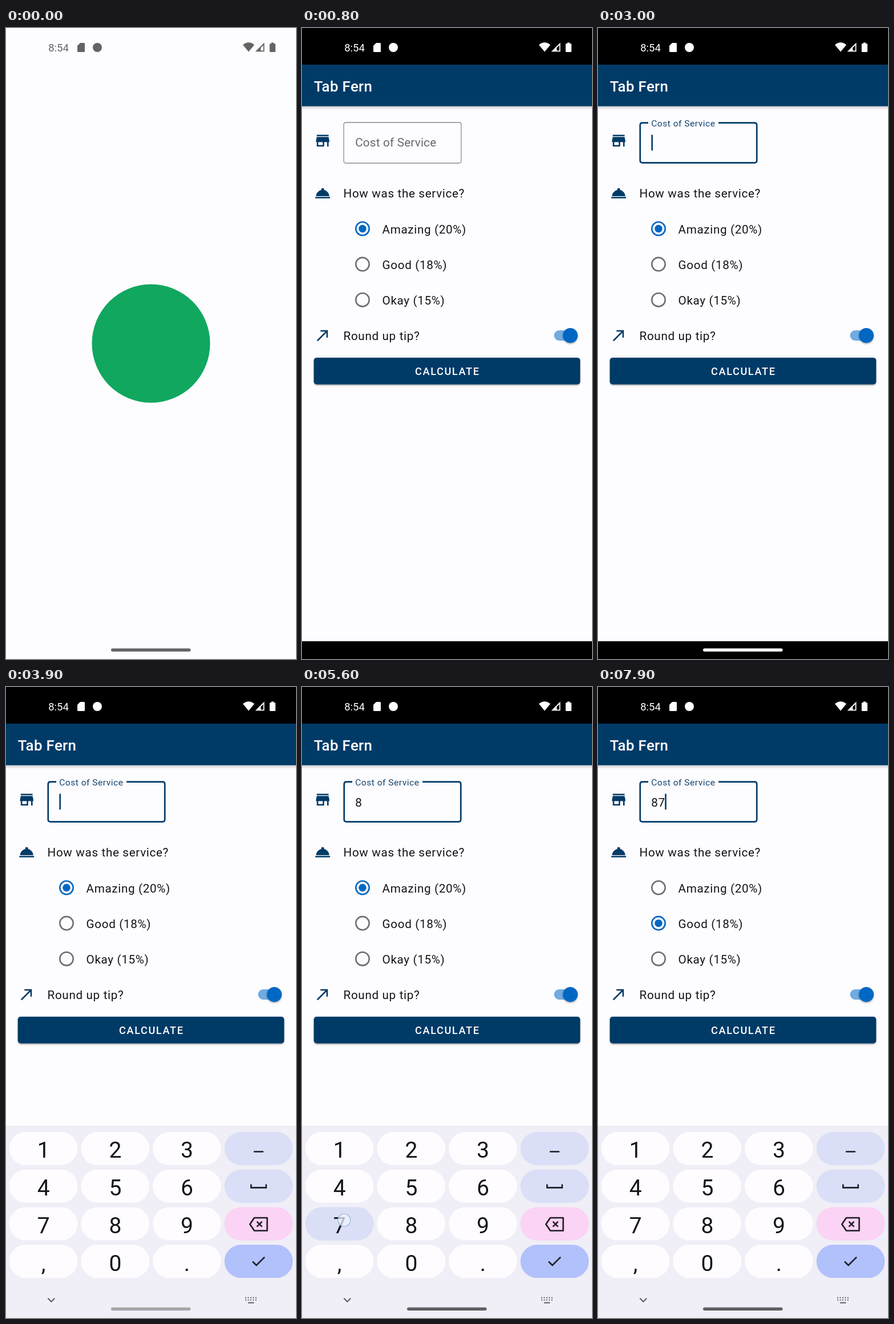
An HTML page that plays this animation: 508x1102 px, repeating every 8000 ms.

```html
<!DOCTYPE html>
<html lang="en">
<head>
<meta charset="utf-8">
<title>Tip calculator</title>
<style>
  html, body { margin: 0; width: 100%; height: 100%; overflow: hidden; background: #fdfcff; }
  svg { display: block; width: 100vw; height: 100vh; }
  text { font-family: Roboto, "Open Sans", sans-serif; white-space: pre; }
  .body { font-size: 20.7px; letter-spacing: .647px; fill: #141417; }
  .title { font-size: 25.9px; font-weight: 500; letter-spacing: .32px; fill: #fff; }
  .button { font-size: 18.1px; font-weight: 500; letter-spacing: 1.62px; fill: #fff; }
  .digit { font-size: 39px; fill: #141418; text-anchor: middle; }
  .line { fill: none; stroke: #1d1d24; stroke-width: 2.6; }
  .navy { fill: #003b68; }
</style>
</head>
<body>
<svg viewBox="0 0 508 1102" preserveAspectRatio="none">
  <defs>
    <linearGradient id="barShade" x2="0" y2="1">
      <stop stop-opacity=".2"/>
      <stop offset="1" stop-opacity="0"/>
    </linearGradient>
    <linearGradient id="sweep" gradientUnits="userSpaceOnUse" x1="0" x2="0">
      <stop stop-color="#fff"/>
      <stop offset="1" stop-color="#000"/>
    </linearGradient>
    <mask id="reveal" maskUnits="userSpaceOnUse" x="0" y="0" width="508" height="1102">
      <rect width="508" height="1102" fill="url(#sweep)"/>
    </mask>
    <filter id="soft" x="-30%" y="-30%" width="160%" height="160%">
      <feGaussianBlur stdDeviation="1.5"/>
    </filter>
  </defs>

  <rect width="508" height="1102" fill="#fdfcff"/>
  <circle id="splash" cx="254" cy="551" r="103.5" fill="#11a75f"/>

  <g id="app">
    <g id="screen">
      <rect width="508" height="1102" fill="#fdfcff"/>
      <rect y="136" width="508" height="7" fill="url(#barShade)"/>
      <rect width="508" height="64.3"/>
      <rect class="navy" y="64" width="508" height="72.6"/>
      <text class="title" x="20.7" y="110.6">Tab Fern</text>

      <g class="navy">
        <path transform="translate(20.7 181.2) scale(1.294)" d="M20 4H4v2h16V4zm1 10v-2l-1-5H4l-1 5v2h1v6h10v-6h4v6h2v-6h1zm-9 4H6v-4h6v4z"/>
        <path transform="translate(20.7 273) scale(1.294)" d="M2 17h20v2H2zm11.84-9.21c.1-.24.16-.51.16-.79 0-1.1-.9-2-2-2s-2 .9-2 2c0 .28.06.55.16.79C6.25 8.6 3.27 11.93 3 16h18c-.27-4.07-3.25-7.4-7.16-8.21z"/>
        <path transform="translate(20.7 521.3) scale(1.294)" d="M9 5v2h6.59L4 18.59 5.41 20 17 8.41V15h2V5z"/>
      </g>

      <path id="outline" fill="none"/>
      <text id="hint" x="93.2">Cost of Service</text>
      <text id="entry" class="body" x="93.2" y="208.8"></text>
      <rect id="cursor" class="navy" y="186.5" width="2.6" height="27.5"/>

      <text class="body" x="72.5" y="296.3">How was the service?</text>
      <g id="radios"></g>
      <text class="body" x="72.5" y="545">Round up tip?</text>

      <rect x="441.5" y="528" width="41" height="18" rx="9" fill="#70abe1"/>
      <circle cx="470" cy="538.6" r="13" opacity=".35" filter="url(#soft)"/>
      <circle cx="470" cy="537" r="13" fill="#0067c3"/>

      <rect x="21" y="578" width="466" height="46" rx="5" opacity=".35" filter="url(#soft)"/>
      <rect class="navy" x="20.7" y="575.7" width="466.6" height="46.8" rx="5"/>
      <text class="button" x="254.8" y="606" text-anchor="middle">CALCULATE</text>
      <rect y="1071" width="508" height="31"/>
    </g>
  </g>

  <g id="pad">
    <rect y="766" width="508" height="340" fill="#f0eef6"/>
    <g id="keys"></g>
    <path class="line" d="M434 811.5H451M429.3 868.5V874.4H455.7V868.5"/>
    <path class="line" stroke-linejoin="round" d="M435 927H457.5V949.5H435L427.3 938.2ZM439.5 933.7L448.5 942.7M448.5 933.7L439.5 942.7"/>
    <path class="line" d="M432 1003.5L438.7 1010L453 995.7"/>
    <path class="line" style="stroke:#5e5d64;stroke-width:2" d="M73.3 1067.5L79.3 1073.5L85.3 1067.5"/>
    <path class="line" style="stroke:#5e5d64;stroke-width:2;stroke-dasharray:2 2.45" d="M419 1066.4H439.5M419 1070.6H439.5"/>
    <path class="line" style="stroke:#5e5d64;stroke-width:2" d="M424 1075.4H434.5"/>
  </g>

  <g id="status">
    <text x="74.2" y="40.6" font-size="18.5">8:54</text>
    <path d="M130 26H136.5Q138 26 138 27.5V40.5Q138 42 136.5 42H126.5Q125 42 125 40.5V31Z"/>
    <circle cx="160" cy="34" r="8"/>
    <path d="M415 29.4Q425 21.2 435 29.4L425 41.5Z"/>
    <path fill-rule="evenodd" d="M436.7 41.3L452.5 25.5V41.3ZM446.3 34.6V39.6H450.7V30.2Z"/>
    <path d="M464.7 25.6H469V27.3H470.8Q472 27.3 472 28.5V40.8Q472 42 470.8 42H463Q461.8 42 461.8 40.8V28.5Q461.8 27.3 463 27.3H464.7Z"/>
  </g>
  <rect id="handle" x="184" y="1083.6" width="139.5" height="5.4" rx="2.7"/>
  <circle id="touch" r="11" fill="#eef5ff" fill-opacity=".72" stroke="#9fb3d6" stroke-width="1.2"/>
</svg>

<script>
const LOOP = 8000, STEP = 100;
const $ = id => document.getElementById(id);
const set = (el, attrs) => { for (const k in attrs) el.setAttribute(k, attrs[k]); };
const add = (parent, tag, attrs, label) => {
  const el = document.createElementNS("http://www.w3.org/2000/svg", tag);
  set(el, attrs);
  if (label) el.textContent = label;
  return parent.appendChild(el);
};
const ramp = (t, from, to) => Math.min(1, Math.max(0, (t - from) / (to - from)));
const mix = (a, b, k) => a + (b - a) * k;
const easeOut = k => 1 - (1 - k) ** 3;
const within = (t, from, to) => t >= from && t < to;

const FOCUS = 2800, TYPE_8 = 4800, TYPE_7 = 5700, PICK = 7100;
const taps = [
  { from: 2700, to: FOCUS, x: 168, y: 203 },
  { from: 4700, to: TYPE_8, x: 199, y: 934, key: "8" },
  { from: 5500, to: TYPE_7, x: 74, y: 931, key: "7" },
  { from: 7000, to: PICK, x: 150, y: 415 }
];

const radios = ["Amazing (20%)", "Good (18%)", "Okay (15%)"].map((label, i) => {
  const cx = 106, cy = 350.5 + i * 62.1, g = $("radios");
  const ripple = add(g, "circle", { cx, cy, r: 26, fill: "#0067c3" });
  const ring = add(g, "circle", { cx, cy, r: 11.7, fill: "none", "stroke-width": 2.6 });
  const dot = add(g, "circle", { cx, cy, fill: "#0067c3" });
  add(g, "text", { class: "body", x: 140.5, y: cy + 8.2 }, label);
  return { ripple, ring, dot };
});

const keyColor = "#fefcff", pressed = "#dadff7";
const sideColors = [pressed, pressed, "#fbd3f4", "#b1c1fb"];
const keys = {};
["123", "456", "789", ",0."].forEach((row, r) => {
  const y = 777 + r * 65.7;
  [...row, ""].forEach((label, c) => {
    const x = 5.7 + c * 125.65;
    const key = add($("keys"), "rect", {
      x, y, width: 119.8, height: 58, rx: 29, fill: label ? keyColor : sideColors[r]
    });
    if (!label) return;
    keys[label] = key;
    add($("keys"), "text", { class: "digit", x: x + 60, y: y + 45.4 }, label);
  });
});

// System bar tint: translucent black (0) to solid white (1).
function tint(el, k) {
  const v = Math.round(255 * k);
  set(el, { fill: `rgb(${v},${v},${v})`, opacity: mix(.6, 1, k) });
}

function drawOpening(t) {
  const k = ramp(t, 400, 800);
  set($("splash"), { opacity: 1 - ramp(t, 100, 400) });
  set($("screen"), { transform: `translate(0 ${14 * (1 - k)})` });
  set($("app"), { opacity: t < 500 ? k * .92 : mix(.23, 1, ramp(t, 500, 800)) });
  if (t < 800) {
    const edge = 510 + (t - 500) * 5;
    set($("sweep"), { y1: edge - 110, y2: edge });
    set($("app"), { mask: "url(#reveal)" });
  } else {
    $("app").removeAttribute("mask");
  }
  tint($("status"), ramp(t, 550, 750));
  tint($("handle"), t < 3000 ? ramp(t, 850, 1050) : 1 - ramp(t, 3820, 4020));
}

function drawField(t) {
  const k = easeOut(ramp(t, FOCUS - 50, FOCUS + 150));
  const focused = t >= FOCUS;
  const inset = focused ? .7 : 0;
  const l = 73.1 + inset, r = 278.9 - inset, top = 165 + inset, b = 236 - inset;
  const mid = 149.5, gap = 61.5 * k;
  set($("outline"), {
    d: `M${mid + gap} ${top}H${r - 4}Q${r} ${top} ${r} ${top + 4}V${b - 4}Q${r} ${b} ${r - 4} ${b}` +
       `H${l + 4}Q${l} ${b} ${l} ${b - 4}V${top + 4}Q${l} ${top} ${l + 4} ${top}H${mid - gap}`,
    stroke: focused ? "#003b68" : "#8b898e",
    "stroke-width": focused ? 2.7 : 1.3
  });
  set($("hint"), {
    y: mix(207.4, 172, k),
    "font-size": mix(20.7, 15.53, k),
    "letter-spacing": mix(.19, .52, k),
    fill: focused ? "#12446e" : "#69676c"
  });

  const value = t >= TYPE_7 ? "87" : t >= TYPE_8 ? "8" : "";
  const blinkFrom = t >= TYPE_7 ? TYPE_7 : t >= TYPE_8 ? TYPE_8 : FOCUS + 100;
  const lit = t >= blinkFrom && (t - blinkFrom) % 1000 < 500;
  $("entry").textContent = value;
  set($("cursor"), { x: 93.4 + value.length * 11.9, opacity: +lit });
}

function drawRadios(t) {
  const k = easeOut(ramp(t, PICK - 50, PICK + 150));
  [1 - k, k, 0].forEach((on, i) => {
    const { ripple, ring, dot } = radios[i];
    set(ring, { stroke: on > .5 ? "#0067c3" : "#706e73" });
    set(dot, { r: 6.7 * on });
    const glow = i === 1 && within(t, PICK - 100, PICK + 300);
    set(ripple, { opacity: glow ? .13 * (1 - ramp(t, PICK, PICK + 300)) : 0 });
  });
}

function drawInput(t) {
  const rise = easeOut(ramp(t, 3050, 3450));
  set($("pad"), {
    transform: `translate(0 ${340 * (1 - rise)})`,
    visibility: rise > 0 ? "visible" : "hidden"
  });
  const tap = taps.find(p => within(t, p.from, p.to));
  for (const name of ["7", "8"]) {
    set(keys[name], { fill: tap && tap.key === name ? pressed : keyColor });
  }
  set($("touch"), { visibility: tap ? "visible" : "hidden" });
  if (tap) set($("touch"), { cx: tap.x, cy: tap.y });
}

function draw(t) {
  drawOpening(t);
  drawField(t);
  drawRadios(t);
  drawInput(t);
}

const start = performance.now();
function tick() {
  const t = (performance.now() - start) % LOOP;
  draw(Math.floor(t / STEP) * STEP);
  requestAnimationFrame(tick);
}
tick();
</script>
</body>
</html>
```
